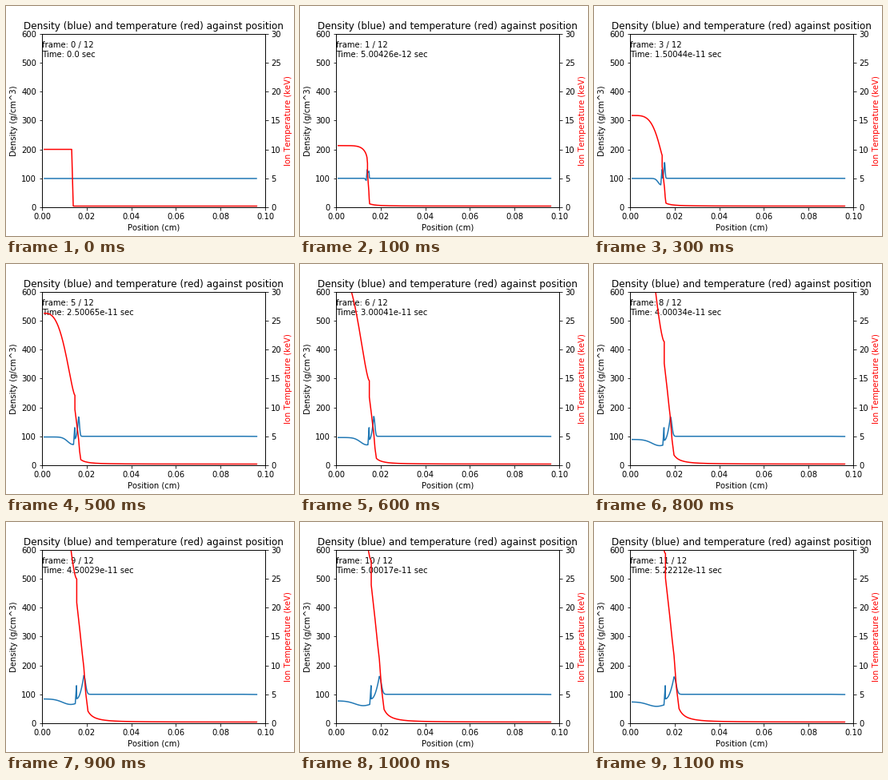
These frames come from a looping animation (360 by 288 pixels, 1.2 s). A matplotlib script:

```python
import numpy as np
import matplotlib.pyplot as plt
from matplotlib.animation import FuncAnimation

FRAMES = 12
TIMES = [0.0, 5.00426e-12, 1.00013e-11, 1.50044e-11, 2.00021e-11, 2.50065e-11,
         3.00041e-11, 3.50022e-11, 4.00034e-11, 4.50029e-11, 5.00017e-11,
         5.22212e-11]
STEP = 5e-12            # seconds per unit of t
X0, X1 = 0.001, 0.0962  # plotted range in cm
COLD, RHO = 0.2, 100    # undisturbed temperature and density
PEAK = 0.63             # place of the density peak inside the shocked shell


def hump(t, peak):
    """Rise to 1 at t = peak, then decay slowly."""
    return t / peak * np.exp(1 - t / peak)


def interface(t):
    return (39 + .35 * t + .0155 * t**2) / 2790


def front(t):
    return (40.8 + 1.15 * t + .078 * t**2) / 2790


def temperature(t):
    a, b = interface(t), front(t)

    # core heats up while its flat top turns into a bell
    u = np.linspace(0, 1, 60)
    centre = 10 + .65 * t**2
    edge = 6.75 + 29.2 / (1 + np.exp((8 - t) / 2))
    p = 1.4 + 5.7 * np.exp(-t / 3.6)
    q = 1.75 - 1.9 * np.exp(-t / 2.5)
    core = edge + (centre - edge) * (1 - u**p)**q

    # shocked shell
    w = np.array([0, .3, .5, .63, .8, 1])
    shell = edge * (.78 + .0007 * t**2) * np.array([1, .75, .57, .465, .25, .1])

    # preheated cold fuel
    x = np.linspace(b, X1, 120)
    tail = COLD + (shell[-1] - COLD) / (1 + (x - b) / .0054)**2

    return (np.concatenate([X0 + (a - X0) * u, a + (b - a) * w, x]),
            np.concatenate([core, shell, tail]))


def density(t):
    a, b = interface(t), front(t)

    # core empties, with a dip that widens and moves inwards
    u = np.linspace(0, .955, 50)
    centre = RHO - .0114 * t**3.3
    dip = .965 - 2.05e-4 * t**3
    width = .02 + .24 * (1 - np.exp(-(t / 5)**2))
    core = centre - 26 * hump(t, 5)**1.5 * np.exp(-((u - dip) / width)**2 / 2)

    # shell piles up to a peak behind the shock front
    start = 83 + 52 * np.exp(-t / 2.8)
    top = RHO + 69 * hump(t, 6.5)
    rise = np.linspace(0, PEAK, 12)
    fall = np.linspace(PEAK, 1.3, 16)
    up = start + (top - start) * (rise / PEAK)**2
    down = RHO + (top - RHO) * np.exp(-((fall - PEAK) / .15)**2 / 2)

    shell = a + (b - a) * np.concatenate([rise, fall])
    return (np.concatenate([X0 + (a - X0) * u, [a - .0001], shell, [X1 - .006, X1]]),
            np.concatenate([core, [130], up, down, [RHO, RHO - .07 * t]]))


plt.rcParams["font.family"] = "DejaVu Sans"
plt.rcParams["text.kerning_factor"] = 6
fig, ax = plt.subplots(figsize=(5, 4), dpi=72)
fig.subplots_adjust(left=.125, right=.9, bottom=.125, top=.88)
ax.set_title("Density (blue) and temperature (red) against position")
ax.set(xlim=(0, .1), ylim=(0, 600),
       xlabel="Position (cm)", ylabel="Density (g/cm^3)")
ax2 = ax.twinx()
ax2.set_ylim(0, 30)
ax2.set_ylabel("Ion Temperature (keV)", color="r")
blue, = ax.plot([], [], color="#1f77b4", lw=1.5)
red, = ax2.plot([], [], color="r", lw=1.5)
label = ax.text(0, 520, "")


def update(n):
    t = TIMES[n] / STEP
    if n == 0:
        blue.set_data([X0, X1], [RHO, RHO])
        red.set_data([X0, .0133, .014, X1], [10, 10, COLD, COLD])
    else:
        blue.set_data(*density(t))
        red.set_data(*temperature(t))
    label.set_text(f"frame: {n} / {FRAMES}\nTime: {TIMES[n]} sec")
    return blue, red, label


anim = FuncAnimation(fig, update, frames=FRAMES, interval=100, repeat=True)
plt.show()
```
